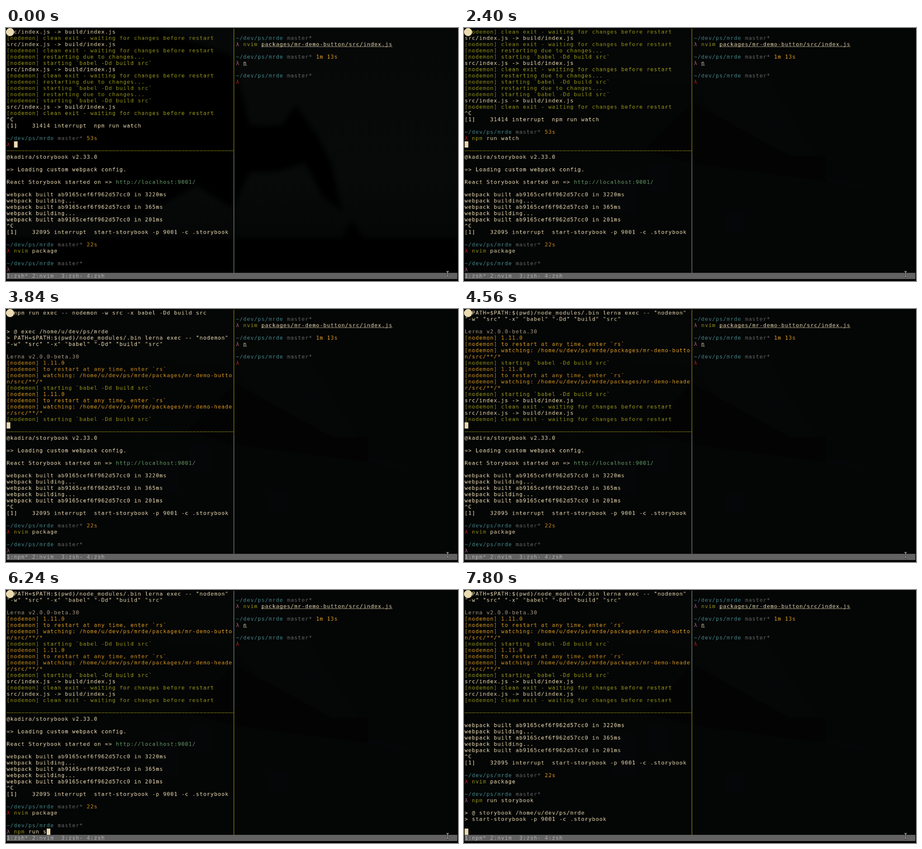
Recreate the animation shown at these times as an HTML page with a canvas. Size 999x561 px, loop 8 s.

```html
<!DOCTYPE html>
<html lang="en">
<head>
<meta charset="utf-8">
<title>Terminal session</title>
<style>
  html, body { margin: 0; width: 100%; height: 100%; overflow: hidden; background: #000; }
  #stage { position: relative; width: 999px; height: 561px; overflow: hidden; }
  #stage > * { position: absolute; left: 0; top: 0; }
  canvas { width: 999px; height: 561px; }
  #badge { width: 18px; height: 18px; border-radius: 50%; background: #ebdbb2; }
</style>
</head>
<body>
<div id="stage">
  <svg width="999" height="561">
    <defs>
      <linearGradient id="sky" x2="0" y2="1">
        <stop offset="0" stop-color="#060808"/><stop offset=".6" stop-color="#080a0a"/><stop offset="1" stop-color="#030404"/>
      </linearGradient>
      <filter id="soft"><feGaussianBlur stdDeviation="6"/></filter>
    </defs>
    <g id="dusk">
      <path fill="url(#sky)" d="M1 0H998V543H1z"/>
      <g filter="url(#soft)">
        <path fill="#050606" d="M0 0H330L500 60 540 215 610 215 640 168 690 240 720 300 745 410 700 375 660 300 600 320 540 320 500 400 420 350 300 420 0 400z"/>
        <path fill="#040404" d="M0 465H740L765 425 790 465H999V543H0z"/>
      </g>
    </g>
    <g id="city">
      <path fill="#040505" d="M1 0H998V543H1z"/>
      <path fill="#050606" d="M250 0H600L780 285H640L505 130 300 110z"/>
      <path fill="#030303" d="M505 165 720 283H800V340L500 300 400 270z"/>
      <path fill="#050607" d="M407 302h46v60h-46zM330 320h50v90h-50zM580 405h40v45h-40zM800 330l90 20v6l-90-16zM660 180l50 30v14l-50-28z"/>
    </g>
  </svg>
  <canvas id="term" width="1366" height="768"></canvas>
  <svg style="left:971px;top:537px" width="11" height="17" fill="none">
    <path d="M2.5 2.5Q5 2.5 5 4.5 5 2.5 7.5 2.5M5 4.5V12.5M2.5 14.5Q5 14.5 5 12.5 5 14.5 7.5 14.5" stroke="#222" stroke-width="3"/>
    <path d="M2.5 2.5Q5 2.5 5 4.5 5 2.5 7.5 2.5M5 4.5V12.5M2.5 14.5Q5 14.5 5 12.5 5 14.5 7.5 14.5" stroke="#ddd"/>
  </svg>
  <div id="badge"></div>
</div>
<script>
const LOOP = 8000, PAD = 2, CELL_W = 11, CELL_H = 19, BASELINE = 15;
const COLORS = { f: '#ebdbb2', g: '#98971a', y: '#d79921', b: '#458588', d: '#666', r: '#cc241d',
  m: '#b16286', a: '#689d6a', l: '#a89984', u: '#ebdbb2', c: '#83a598', s: '#b2b2b2' };
const $ = id => document.getElementById(id);

// The terminal is drawn at its native size and shown scaled down.
const ctx = $('term').getContext('2d');
ctx.font = '16px "DejaVu Sans Mono", monospace';
ctx.letterSpacing = CELL_W - ctx.measureText('0').width + 'px';

function fillCells(col, row, cols, color, width = cols * CELL_W) {
  ctx.fillStyle = color;
  ctx.fillRect(PAD + col * CELL_W, PAD + row * CELL_H, width, CELL_H);
}

// "#x" switches to colour x; "#f" is the plain foreground and "#u" underlines.
function print(line, col, row) {
  const y = PAD + row * CELL_H;
  for (const part of ('#f' + line).split('#').slice(1)) {
    const text = part.slice(1), x = PAD + col * CELL_W;
    ctx.fillStyle = COLORS[part[0]];
    ctx.fillText(text, x, y + BASELINE);
    if (part[0] === 'u') ctx.fillRect(x, y + BASELINE + 1, text.length * CELL_W, 1);
    col += text.length;
  }
}
const printAll = (lines, col, row) => lines.forEach((line, i) => print(line, col, row + i));

const HOME = '/home/u/dev/ps/mrde';
const prompt = (time = '') => `#b~/dev/ps/mrde #dmaster* #y${time}`;
const built = 'src/index.js -> build/index.js';
const nodemon = text => `#g[nodemon] ${text}`;
const clean = nodemon('clean exit - waiting for changes before restart');
const restart = nodemon('restarting due to changes...');
const start = nodemon('starting `babel -Dd build src`');
const watcher = (name, rest) => [
  '#y[nodemon] 1.11.0',
  '#y[nodemon] to restart at any time, enter `rs`',
  `#y[nodemon] watching: ${HOME}/packages/mr-demo-${name}`,
  `#y${rest}/src/**/*`,
  start
];
const webpack = ms => `webpack built ab9165cef6f962d57cc0 in ${ms}ms`;

const watchLine = '#rλ #gnpm#f run watch';
const topLog = [
  built, clean, built, clean, restart, start, built, clean, restart, start,
  restart, start, built, clean, '^C', '[1]    31414 interrupt  npm run watch', '',
  prompt('53s'), watchLine,
  '', `> @ watch ${HOME}`, '> npm run exec -- nodemon -w src -x babel -Dd build src', '',
  '', `> @ exec ${HOME}`, '> PATH=$PATH:$(pwd)/node_modules/.bin lerna exec -- "nodemon"',
  '"-w" "src" "-x" "babel" "-Dd" "build" "src"', '',
  '#lLerna v2.0.0-beta.30',
  ...watcher('butto', 'n'), ...watcher('heade', 'r'),
  built, clean, built, clean
];
const lowLog = [
  '@kadira/storybook v2.33.0', '', '=> Loading custom webpack config.', '',
  'React Storybook started on => #ahttp://localhost:9001/', '',
  webpack(3220), 'webpack building...', webpack(365), 'webpack building...', webpack(201),
  '^C', '[1]    32095 interrupt  start-storybook -p 9001 -c .storybook', '',
  prompt('22s'), '#rλ #gnvim#f package', '', prompt(),
  '#mλ #gnpm#f run storybook',
  '', `> @ storybook ${HOME}`, '> start-storybook -p 9001 -c .storybook', ''
];
const rightPane = ['', prompt(), '#mλ #gnvim#f #upackages/mr-demo-button/src/index.js', '',
  prompt('1m 13s'), '#mλ #un', '', prompt(), '#rλ'];

// [time, value] steps
const topCount = [[0, 18], [2400, 19], [2760, 23], [3240, 28], [3600, 29], [3840, 39], [4560, 43]];
const lowCount = [[0, 18], [7320, 19], [7800, 23]];
const typedCount = [[0, 0], [5400, 1], [5520, 2], [5640, 3], [5760, 4], [5880, 5], [6000, 6], [6120, 8],
  [6240, 9], [6360, 10], [6480, 11], [6600, 12], [6720, 14], [6960, 15], [7080, 17]];
const windowName = [[0, 'zsh'], [3240, 'npm'], [5400, 'zsh'], [7800, 'npm']];
const at = (steps, t) => steps.findLast(([time]) => time <= t)[1];

const view = (log, count, input) => [...log.slice(count - 18, count), input];

function typedInput(n) {
  const text = 'npm run storybook'.slice(0, n);
  const style = n === 1 ? 'u' : n === 2 ? 'r' : 'g';
  return `#mλ #${style}${text.slice(0, 3)}#f${text.slice(3)}`;
}

function draw(t) {
  const topN = at(topCount, t), lowN = at(lowCount, t), typed = at(typedCount, t);
  const lowActive = t >= 4680, recalled = t >= 600;

  ctx.clearRect(0, 0, 1366, 768);
  printAll(view(topLog, topN, topN > 18 ? '' : recalled ? watchLine : '#rλ'), 0, 0);
  printAll(view(lowLog, lowN, lowN > 18 ? '' : typedInput(typed)), 0, 20);
  printAll(rightPane, 63, 0);

  print('#g' + '─'.repeat(62) + '┤', 0, 19);
  for (let row = 0; row < 39; row++) {
    if (row !== 19) print((row > 19) === lowActive ? '#g│' : '#c│', 62, row);
  }

  const col = lowActive ? (lowN > 18 ? 0 : 2 + typed) : (topN > 18 ? 0 : recalled ? 15 : 2);
  fillCells(col, lowActive ? 38 : 18, 1, COLORS.f);

  fillCells(0, 39, 124, '#626262', 1362);
  print(`#s1:${at(windowName, t)}* 2:nvim  3:zsh- 4:zsh`, 0, 39);

  $('dusk').style.display = t < 1200 ? '' : 'none';
  $('city').style.display = t < 1200 ? 'none' : '';
}

(function tick() {
  draw(performance.now() % LOOP);
  requestAnimationFrame(tick);
})();
</script>
</body>
</html>
```
